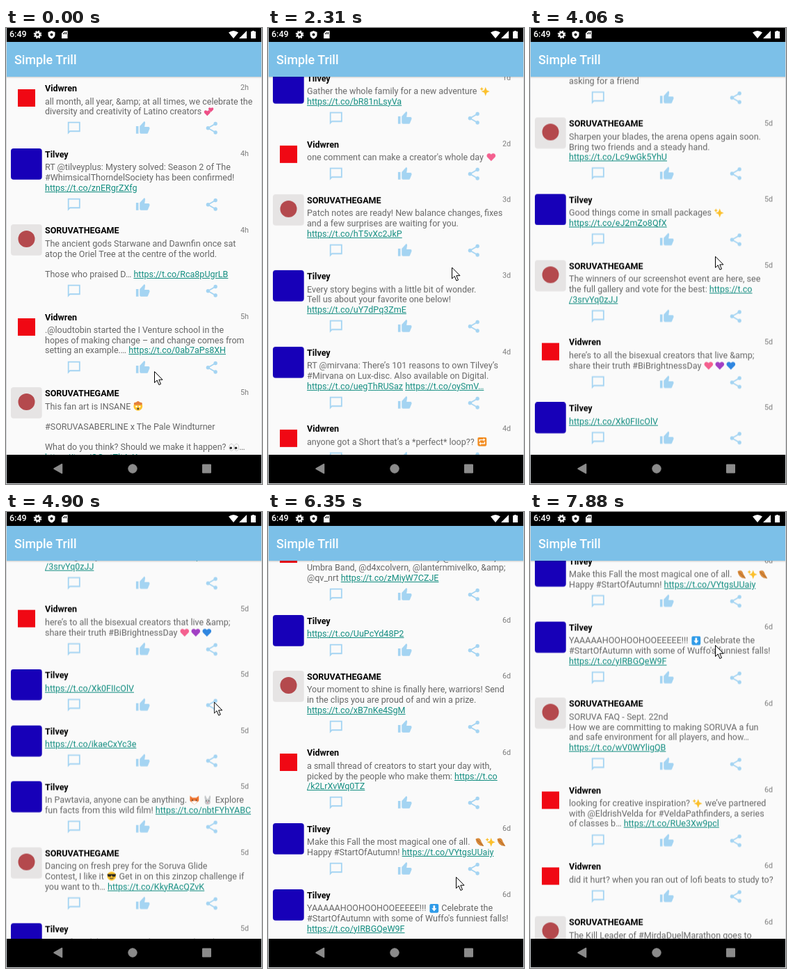
Write an HTML page that moves like this. It is 368x655 px and loops after 8000 ms.

```html
<!DOCTYPE html>
<html lang="en">
<head>
<meta charset="utf-8">
<title>Simple Trill</title>
<style>
html, body { margin: 0; width: 100%; height: 100%; overflow: hidden; background: #fafafa; }
body { position: relative; font: 12.53px/14.65px Roboto, sans-serif; color: #676767; }
body > *, .post, .post > * { position: absolute; }
#list { left: 0; top: 0; will-change: transform; }
.post { left: 0; width: 368px; white-space: pre; }
.post b { left: 56px; top: 2px; color: #000; }
.post time { right: 19px; top: 1.2px; font-size: 10.74px; line-height: 13px; color: #7c7c7c; }
.post p { left: 56px; top: 20.5px; margin: 0; }
.post u { color: #128d80; }
.post .tile { left: 6.6px; top: 0; }
.emo { width: 15.6px; height: 14.6px; vertical-align: 0; margin: -3px 0; }
#head { left: 0; top: 20px; width: 368px; height: 50px; background: #7cc0e8; color: #fff;
  font: 500 17.9px/51px Roboto, sans-serif; text-indent: 12px; box-shadow: 0 1px 2px #0003; }
#edge { inset: 0; border: solid #d4d8da; border-width: 0 1px 1px; }
#status { left: 0; top: 0; width: 368px; height: 20px; background: #000; }
#nav { left: 0; top: 613px; width: 368px; height: 42px; background: #000; }
#clock { left: 5px; top: 2px; color: #fff; font-weight: 500; }
#pointer { left: 0; top: 0; }
</style>
</head>
<body>
<div id="list"></div>
<div id="head">Simple Trill</div>
<svg id="status" viewBox="0 0 368 20" fill="#fff">
  <circle cx="45.5" cy="9.5" r="3.2" fill="none" stroke="#fff" stroke-width="2.4"/>
  <circle cx="45.5" cy="9.5" r="5" fill="none" stroke="#fff" stroke-width="1.5" stroke-dasharray="2.2 1.73"/>
  <path d="M65.5 4l5 2v3.5q0 4-5 6-5-2-5-6V6z"/>
  <circle cx="65.5" cy="9.5" r="1.9" fill="#000"/>
  <path d="M83.5 4H88.5V15H80V7.5z"/>
  <path d="M82.5 7v2M84.5 6v3M86.5 6v3" stroke="#000"/>
  <path d="M320 6.5q7-5 14 0L327 15zM346 4V15H335zM352 5h2V4h3v1h2V15h-7z"/>
</svg>
<div id="clock">6:49</div>
<svg id="nav" viewBox="0 1 368 42" fill="#8b8b8b" stroke="#8b8b8b" stroke-linejoin="round">
  <path d="M69 21l11.5-6.5v13z" stroke-width="1.5"/>
  <circle cx="182" cy="21" r="6.2"/>
  <rect x="282.5" y="15" width="12" height="12"/>
</svg>
<div id="edge"></div>
<svg id="pointer" width="16" height="22"><path d="M.5.5V16.5l3.7-3.5 2.7 6.5 2.6-1.1-2.7-6.2H12z" fill="#fff" stroke="#000"/></svg>

<script>
// Each row: author, age, then the lines of the post.
const feed = `V 2h|all month, all year, &amp; at all times, we celebrate the|diversity and creativity of Latino creators 💕
T 4h|RT @tilveyplus: Mystery solved: Season 2 of The|#WhimsicalThorndelSociety has been confirmed!|https://t.co/znERgrZXfg
S 4h|The ancient gods Starwane and Dawnfin once sat|atop the Oriel Tree at the centre of the world.||Those who praised D… https://t.co/Rca8pUgrLB
V 5h|.@loudtobin started the I Venture school in the|hopes of making change – and change comes from|setting an example.… https://t.co/0ab7aPs8XH
S 5h|This fan art is INSANE 🤯||#SORUVASABERLINE x The Pale Windturner||What do you think? Should we make it happen? 👀…|https://t.co/QGwtTlt4xX
T 5h|"Let me see... I know how to fence and you don't. Or, I|have class and you don't. Take your pick." 🤺 Stream|The Pel… https://t.co/DArSTRhF1L
V 5h|liking &amp; subscribing is self-care
V 6h|who takes your breath? 🌬 @Orrin_Velmora,|@Tho_Lunmarsh &amp; friends share the looks|that made them stop and stare
S 8h|A quiet night on the island, until the bells begin.|Which hero would you bring along?|https://t.co/Wm4KzpQe7d
T 1d|Gather the whole family for a new adventure ✨|https://t.co/bR81nLsyVa
V 2d|one comment can make a creator's whole day 💗
S 3d|Patch notes are ready! New balance changes, fixes|and a few surprises are waiting for you.|https://t.co/hT5vXc2JkP
T 3d|Every story begins with a little bit of wonder.|Tell us about your favorite one below!|https://t.co/uY7dPq3ZmE
T 4d|RT @mirvana: There’s 101 reasons to own Tilvey’s|#Mirvana on Lux-disc. Also available on Digital.|https://t.co/uegThRUSaz https://t.co/oySmV…
V 4d|anyone got a Short that’s a *perfect* loop?? 🔁
S 5d|Bored and nobody to talk to while you're gaming|tonight? Come chat with us in the official|#Soruvasaberline discor… https://t.co/TWI1TgCCzT
V 5d|RT @VidwrenCreators: Happy International|#WeekOfHandSpeaking! Today @nellavorrick, a|creator, consultant, and writer who talks about|access…
S 5d|"The difference of skill is...crazy" 😂 Watch @glimor|learn the ins and outs of Mirda Quo and tear up the|servers wi… https://t.co/twsydFfa8I
T 5d|Start the weekend with a song in your heart and|someone you love by your side.|https://t.co/pN6sVx0RtB
V 5d|what was the last video that made you laugh? 😂|asking for a friend
S 5d|Sharpen your blades, the arena opens again soon.|Bring two friends and a steady hand.|https://t.co/Lc9wGk5YhU
T 5d|Good things come in small packages ✨|https://t.co/eJ2mZo8QfX
S 5d|The winners of our screenshot event are here, see|the full gallery and vote for the best: https://t.co|/3srvYq0zJJ
V 5d|here’s to all the bisexual creators that live &amp;|share their truth #BiBrightnessDay 💗💜💙
T 5d|https://t.co/Xk0FIIcOlV
T 5d|https://t.co/ikaeCxYc3e
T 5d|In Pawtavia, anyone can be anything. 🦊 🐰 Explore|fun facts from this wild film! https://t.co/nbtFYhYABC
S 5d|Dancing on fresh prey for the Soruva Glide|Contest, I like it 😎 Get in on this zinzop challenge if|you want to th… https://t.co/KkyRAcQZvK
T 5d|Some friendships are simply meant to be. Share|this with someone who makes you smile.|https://t.co/aG3rWu6NsD
V 6d|the best playlists are the ones made by friends|who know you a little too well
T 6d|In one month the Q*Pod adventure of a lifetime|begins! #NedsOffCourse hits theaters October 22!|https://t.co/bmFBHaGFX6
T 6d|Experience #OrbFeudGlimpses, now streaming on|#TilveyPlus. https://t.co/TPAIKTsbFu
S 6d|Credit : @QMolvane|We found you!
V 6d|✨ fabulous fashion✨ flaunted by @lorettavund,|Umbra Band, @d4xcolvern, @lanternmivelko, &amp;|@qv_nrt https://t.co/zMiyW7CZJE
T 6d|https://t.co/UuPcYd48P2
S 6d|Your moment to shine is finally here, warriors! Send|in the clips you are proud of and win a prize.|https://t.co/xB7nKe4SgM
V 6d|a small thread of creators to start your day with,|picked by the people who make them: https://t.co|/k2LrXvWq0TZ
T 6d|Make this Fall the most magical one of all.  🍂✨🍂|Happy #StartOfAutumn! https://t.co/VYtgsUUaiy
T 6d|YAAAAAHOOHOOHOOEEEEE!!! ⬇ Celebrate the|#StartOfAutumn with some of Wuffo's funniest falls!|https://t.co/yIRBGQeW9F
S 6d|SORUVA FAQ - Sept. 22nd|How we are committing to making SORUVA a fun|and safe environment for all players, and how…|https://t.co/wV0WYligQB
V 6d|looking for creative inspiration? ✨ we’ve partnered|with @EldrishVelda for #VeldaPathfinders, a series|of classes b… https://t.co/RUe3Xw9pcl
V 6d|did it hurt? when you ran out of lofi beats to study to?
S 6d|The Kill Leader of #MirdaDuelMarathon goes to|a player nobody saw coming.`.split('\n');

const shape = (d, fill, extra = '') => `<path d="${d}" fill="${fill}" ${extra}/>`;
const line = (d, color, w = 1.3) => shape(d, 'none', `stroke="${color}" stroke-width="${w}"`);
const dot = (x, y, r, fill) => `<circle cx="${x}" cy="${y}" r="${r}" fill="${fill}"/>`;
const box = (x, y, size, fill, r = 0) => `<rect x="${x}" y="${y}" width="${size}" height="${size}" rx="${r}" fill="${fill}"/>`;

const authors = {
  V: ['Vidwren', box(10, 10, 25, '#f00814')],
  T: ['Tilvey', box(0, 0, 44.7, '#1700b8', 4)],
  S: ['SORUVATHEGAME', box(0, 0, 44.7, '#e6e4e4', 4) + dot(22.5, 21, 12, '#b4494d')]
};

const heart = (fill, move = '') => shape('M8 14.5L2 8.5C-1 4.5 4 0 8 4.2C12 0 17 4.5 14 8.5Z', fill, `transform="${move}"`);
const face = dot(8, 8, 7, '#fcc52f');
const emoji = {
  '💕': heart('#ee4f86', 'translate(-.5 4) scale(.72)') + heart('#ee4f86', 'translate(6.5 0) scale(.58)'),
  '💗': heart('#f4608f'), '💜': heart('#a13fc4'), '💙': heart('#2f86e0'),
  '🤯': face + shape('M2 6Q0 1 5 2Q8-2 11 2Q16 1 14 6Z', '#e6803c') + dot(5.5, 8.5, 1.4, '#fff') + dot(10.5, 8.5, 1.4, '#fff') + dot(8, 12, 1.6, '#543'),
  '👀': [4, 12].map(x => `<ellipse cx="${x}" cy="8" rx="3.5" ry="5.5" fill="#fff" stroke="#aaa" stroke-width=".7"/>` + dot(x - 1, 9, 1.9, '#222')).join(''),
  '🤺': dot(9, 3, 2, '#8a8f94') + line('M9 5L8 10L4 15M8 10L13 15M9 6L4 7M9 6L14 8M5 7L0 3', '#8a8f94', 1.6),
  '🌬': dot(10, 8, 5.5, '#a9cfe4') + line('M0 8H7M1 11H7M2 5H6', '#6ba9d0') + dot(11, 6, 1, '#456'),
  '🔁': box(1, 1, 14, '#f28b1e', 2) + line('M4 8V5H11M12 8V11H5', '#fff', 1.5) + shape('M10 2.5L13 5L10 7.5ZM6 8.5L3 11L6 13.5Z', '#fff'),
  '😂': face + line('M4 6L6 5M10 5L12 6', '#543') + shape('M4 8H12Q11 13 8 13T4 8Z', '#6b3a1c') + dot(2.5, 10, 2.2, '#4ab4ee') + dot(13.5, 10, 2.2, '#4ab4ee'),
  '😎': face + shape('M1 5H15L13.5 9H9.5L8 6.5L6.5 9H2.5Z', '#222') + line('M5 11Q8 13 11 11', '#543'),
  '🦊': shape('M1 1L5 4H11L15 1V9L8 15L1 9Z', '#ee7430') + shape('M3 10L8 9L13 10L8 15Z', '#fff') + dot(5, 8, 1, '#333') + dot(11, 8, 1, '#333'),
  '🐰': shape('M4 8Q2 0 5 1L7 6H9L11 1Q14 0 12 8Q14 15 8 15T4 8Z', '#c5c8ca') + dot(6, 9, .9, '#444') + dot(10, 9, .9, '#444') + dot(8, 11.5, 1, '#e58b9b'),
  '✨': shape('M9 1L11 6L15.5 8L11 10L9 15L7 10L2.5 8L7 6ZM3 1L4 3L6 4L4 5L3 7L2 5L0 4L2 3Z', '#fbc02d'),
  '🍂': shape('M1 3Q8-1 10 7L14 14Q3 15 1 3Z', '#d98a3a') + line('M3 4L13 14', '#9a5a24', 1),
  '⬇': box(1, 1, 14, '#2f9be8', 2) + shape('M6.5 3.5H9.5V8H12L8 12.5L4 8H6.5Z', '#fff')
};

const BLUE = '#a4d4f2';
const actions = [
  [98, line('M3 19.5V3H21V17H5.5Z', BLUE, 2)],
  [196.7, shape('M1 9h4v12H1zM7 9L14.2 1q2 1 1.5 3L14.7 10H21q2 0 2 2.7L20 20q-.6 1-2 1H9q-2 0-2-2z', BLUE)],
  [295.5, line('M18 5L6 12L18 19', BLUE, 2) + dot(18, 5, 3, BLUE) + dot(6, 12, 3, BLUE) + dot(18, 19, 3, BLUE)]
];

const list = document.getElementById('list'), pointer = document.getElementById('pointer');
const LINE = 14.65;
let bottom = 78;

const rich = s => s.replace(/&/g, '&amp;')
  .replace(/(https:\/|^)\/\S+/g, '<u>$&</u>')
  .replace(/\p{Extended_Pictographic}/gu, c => `<svg class="emo" viewBox="0 0 16 16">${emoji[c]}</svg>`);

list.innerHTML = feed.map(row => {
  const [meta, ...lines] = row.split('|'), [who, age] = meta.split(' ');
  const [name, tile] = authors[who], top = bottom, h = LINE * lines.length;
  bottom += 65.6 + h;
  return `<div class="post" style="top:${top}px">
<svg class="tile" width="45" height="45">${tile}</svg><b>${name}</b><time>${age}</time><p>${lines.map(rich).join('\n')}</p>` +
    actions.map(([x, art]) => `<svg viewBox="0 0 24 24" width="21.5" height="21.5" style="left:${x - 10.75}px;top:${26 + h}px">${art}</svg>`).join('') + '</div>';
}).join('');

// Swipes: the list follows the pointer from press to release, then glides on
// while the pointer moves to the next press. Times are in screen refreshes.
const swipe = (press, x0, y0, release, x1, y1, glide) => ({ press, x0, y0, release, x1, y1, glide });
const swipes = [
  swipe(0, 213, 493, 0, 213, 493, 0),
  swipe(3, 218, 517, 8, 235, 290, 60.6),
  swipe(13, 246, 503, 16, 250, 200, 485.2),
  swipe(20, 278, 487, 24, 250, 158, 250),
  swipe(27, 251, 511, 30, 266, 230, 207.2),
  swipe(33, 266, 523, 38, 307, 210, 230.7),
  swipe(41, 262, 440, 44, 236, 36, 359.3),
  swipe(48, 270, 524, 53, 279, 194, 54.5),
  swipe(60, 266, 191, 60, 266, 191, 0)
];
const REFRESH = 131.3, LEAD = 55;

const mix = (a, b, u) => a + (b - a) * u;
const settle = u => 1 - (1 - u) ** 3;
const part = (t, from, to) => to > from ? Math.min(1, Math.max(0, (t - from) / (to - from))) : +(t >= to);

function draw() {
  const step = Math.floor((performance.now() % 8000 + LEAD) / REFRESH);
  let scroll = 0, x, y;
  swipes.forEach((s, i) => {
    if (step < s.press) return;
    const next = swipes[i + 1] || s;
    const drag = part(step, s.press, s.release), rest = part(step, s.release, next.press);
    scroll += (s.y0 - s.y1) * drag + s.glide * settle(rest);
    x = mix(mix(s.x0, s.x1, drag), next.x0, rest);
    y = mix(mix(s.y0, s.y1, drag), next.y0, rest);
  });
  list.style.transform = `translateY(${-scroll}px)`;
  pointer.style.transform = `translate(${x}px, ${y}px)`;
  requestAnimationFrame(draw);
}
draw();
</script>
</body>
</html>
```
